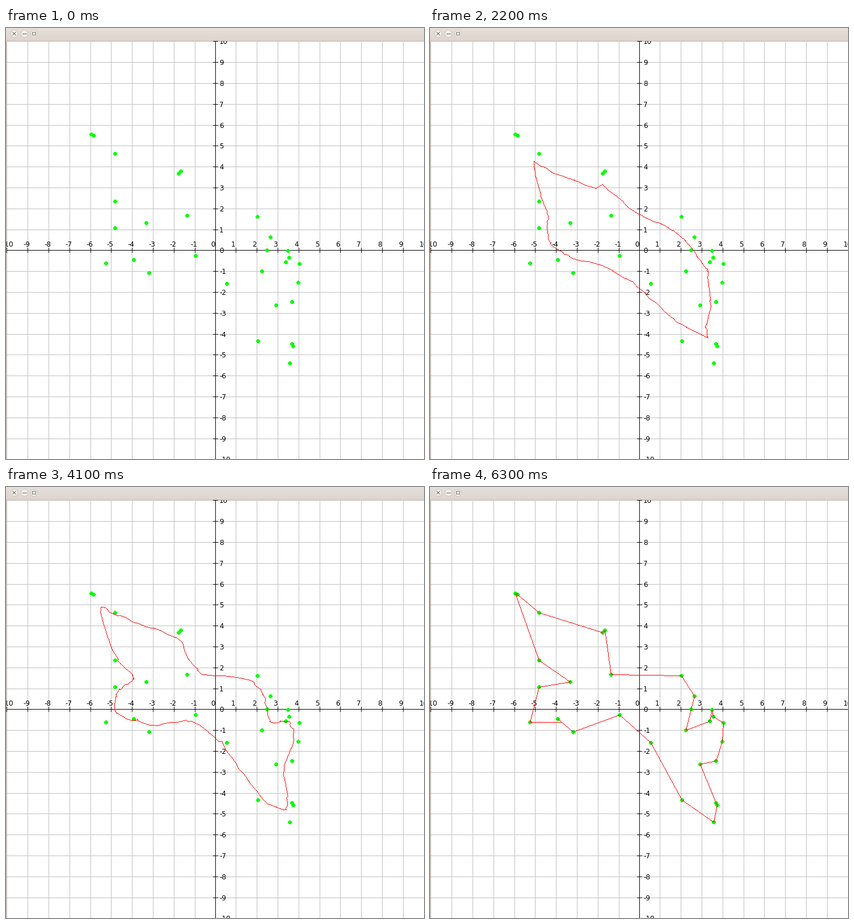
Recreate the animation shown at these times as a matplotlib script. Size 737 by 759 pixels, loop 7300 ms.

```python
import numpy as np
import matplotlib.pyplot as plt
from matplotlib.animation import FuncAnimation
from matplotlib.patches import Circle, Rectangle

W, H, DPI = 737, 759, 64
PX = 72 / DPI
CX, CY, UNIT = 369, 391.4, 36.8
STEP, LOOP = 100, 7300
APPEAR, GROWN, START, DONE = 900, 1200, 1500, 6100
UPDATES = [900, 1100, 1200, 1500, 1700, 1800, 2000, 2200, 2300, 3000, 3200,
           3400, 3500, 3600, *range(3800, 4101, 100), *range(4300, 4901, 100),
           *range(5100, 5801, 100), 6000, 6100]

# Cities in visiting order
CITIES = [(150, 187), (154, 189), (192, 221), (304, 256), (308, 252), (319, 330),
          (443, 332), (466, 368), (460, 391), (451, 428), (493, 412), (497, 392),
          (499, 404), (517, 415), (515, 448), (504, 482), (476, 488), (504, 556),
          (506, 560), (500, 590), (444, 551), (389, 450), (334, 401), (252, 431),
          (225, 408), (176, 414), (192, 352), (247, 343), (192, 305)]
# Where the young ring passes, keyed by the tour stop it later reaches
YOUNG = {0: (188, 244), 2: (226, 272), 3: (293, 291), 4: (307, 279), 5: (375, 330),
         6: (425, 358), 8: (466, 391), 10: (487, 427), 14: (484, 432),
         15: (491, 480), 16: (495, 486), 18: (483, 514), 19: (493, 538),
         20: (428, 505), 21: (345, 443), 22: (279, 413), 23: (262, 405),
         26: (216, 370), 27: (207, 335), 29: (201, 316)}


def as_complex(points):
    return np.array([complex(*p) for p in points])


# The tour doubles back a little after the stop at (225, 408)
tour = as_complex(CITIES[:25] + [(232, 414)] + CITIES[25:])
arc = np.r_[0, np.cumsum(abs(np.diff(np.r_[tour, tour[0]])))]
stops, length = arc[:-1], arc[-1]
samples = np.linspace(0, length, int(length), endpoint=False)
spectrum = np.fft.fft(np.interp(samples, stops, tour, period=length))
freq = np.fft.fftfreq(len(samples), length / len(samples))
nodes = np.union1d(stops, np.arange(0, length, 16))
young = np.interp(nodes, stops[list(YOUNG)], as_complex(YOUNG.values()),
                  period=length)


def smooth_tour(sigma):
    z = np.fft.ifft(spectrum * np.exp(-2 * (np.pi * freq * sigma) ** 2))
    return np.interp(nodes, samples, z, period=length)


def rescale(v, lo, hi):
    return lo + (v - v.min()) / np.ptp(v) * (hi - lo)


def ring_at(ms):
    if ms < GROWN:
        f = (ms - APPEAR) / (GROWN - APPEAR)
        first = rescale(young.real, 182, 493) + 1j * rescale(young.imag, 219, 465)
        return first + f * (young - first)
    if ms >= DONE:
        return tour
    # The ring is drawn to the tour while its neighbourhood shrinks
    p = max(0, (ms - START) / (DONE - START))
    pull = np.sin(np.pi / 2 * p) ** 0.8
    rng = np.random.default_rng(ms)
    shake = rng.normal(size=len(nodes)) + 1j * rng.normal(size=len(nodes))
    return (young + pull * (smooth_tour(60 * (1 - p)) - young)
            + 1.6 * np.sin(np.pi * p) * shake)


def pixels(ring):
    """Pixel columns and rows of a closed one-pixel line."""
    runs = []
    for a, b in zip(ring, np.roll(ring, -1)):
        d = b - a
        n = int(np.ceil(max(abs(d.real), abs(d.imag)))) + 1
        runs.append(np.linspace(a, b, n))
    z = np.concatenate(runs)
    return np.rint(z.real).astype(int), np.rint(z.imag).astype(int)


def draw_plane():
    img = np.full((H, W, 3), 255, np.uint8)
    xs = [CX + int(UNIT * n) for n in range(-10, 11)]
    ys = [round(CY - UNIT * n) for n in range(-10, 11)]
    img[:, [x for x in xs if x < W]] = 192
    img[[y for y in ys if y < H]] = 192
    img[:, CX] = img[round(CY)] = 0
    for n, x, y in zip(range(-10, 11), xs, ys):
        img[387:396, x:x + 1] = 0
        img[y:y + 1, 365:374] = 0
        label(x - 8.5, 384.5, n)
        label(375.5, y + 4.5, n)
    return img


def draw_front():
    img = np.zeros((H, W, 4), np.uint8)
    fade = np.linspace(0, 1, 23)[:, None, None]
    img[:23, :, :3] = (1 - fade) * [229, 224, 218] + fade * [222, 212, 205]
    img[:23, :, 3] = 255
    img[22] = 213, 203, 196, 255
    img[23:, 0] = 207, 193, 185, 255
    dy, dx = np.mgrid[-3:4, -3:4]
    disc = dx ** 2 + dy ** 2 <= 10
    for x, y in CITIES:
        img[y - 3:y + 4, x - 3:x + 4][disc] = 0, 255, 0, 255
    return img


def label(x, y, n):
    ax.text(x, y, str(n), family="DejaVu Sans", size=12 * PX, color="black",
            ha="left", va="baseline", zorder=2, clip_on=True)


def draw_buttons():
    ink = "#77726c"
    for x in (14, 32, 49):
        ax.add_patch(Circle((x, 9.5), 6.3, fc="#f1eeea", ec="#c9c1b9",
                            lw=0.8 * PX, zorder=4))
    for x, y in (([11.5, 16.5], [7, 12]), ([11.5, 16.5], [12, 7]),
                 ([28.5, 35.5], [9.8, 9.8])):
        ax.plot(x, y, color=ink, lw=1.1 * PX, zorder=5)
    ax.add_patch(Rectangle((46, 7), 6, 5, fc="none", ec=ink, lw=PX, zorder=5))


fig = plt.figure(figsize=(W / DPI, H / DPI), dpi=DPI, facecolor="white")
ax = fig.add_axes([0, 0, 1, 1])
view = dict(extent=(-0.5, W - 0.5, H - 0.5, -0.5), interpolation="nearest",
            aspect="auto")
front = draw_front()
ax.imshow(draw_plane(), zorder=1, **view)
layer = ax.imshow(front, zorder=3, **view)
draw_buttons()
ax.set_xlim(-0.5, W - 0.5)
ax.set_ylim(H - 0.5, -0.5)
ax.axis("off")


def update(i):
    img = front.copy()
    past = [ms for ms in UPDATES if ms <= i * STEP]
    if past:
        x, y = pixels(ring_at(past[-1]))
        img[y, x] = 255, 0, 0, 255
    layer.set_data(img)
    return (layer,)


anim = FuncAnimation(fig, update, frames=LOOP // STEP, interval=STEP,
                     repeat=True, repeat_delay=0, blit=False)
plt.show()
```
